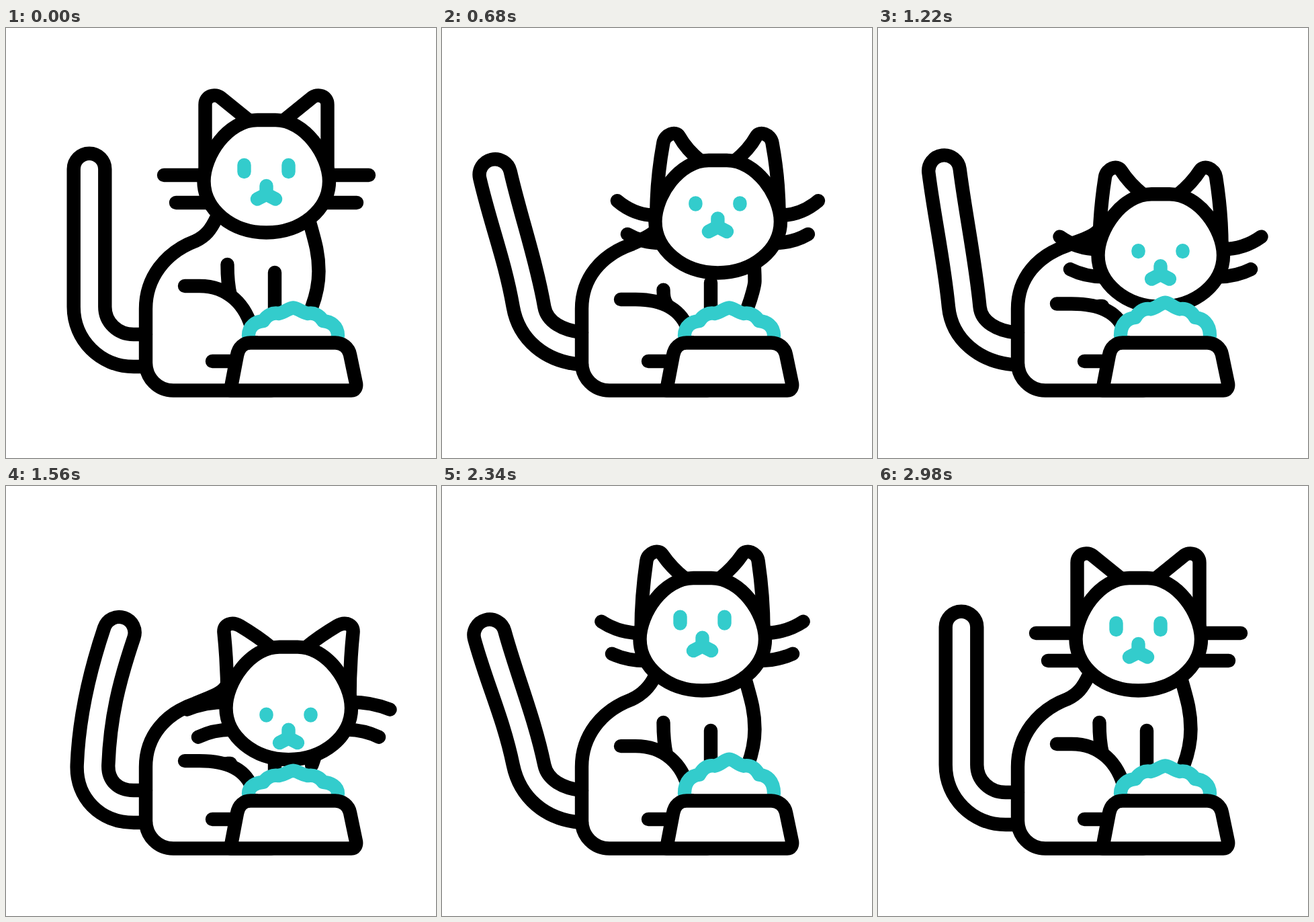
Animation, 640 px wide and 640 px high, one loop 3.3 s. Source, as an HTML page:

```html
<!DOCTYPE html>
<html lang="en">
<head>
<meta charset="utf-8">
<title>Cat at its bowl</title>
<style>
  html, body { margin: 0; width: 100%; height: 100%; overflow: hidden; background: #fff; }
  svg { display: block; width: 100vw; height: 100vh; }
  path { fill: none; stroke: #000; stroke-width: 20.4; stroke-linecap: round; stroke-linejoin: round; }
  .solid { fill: #fff; }
  .teal { stroke: #33cccc; }
</style>
</head>
<body>
<svg viewBox="0 0 640 640">
  <path id="tail"/>
  <path id="body"/>
  <path id="legs"/>
  <g id="head">
    <path id="whiskers"/>
    <path id="ears"/>
    <path class="solid" d="M374 137H401C445 137 481 190 481 228C481 270 440 304.500 387.500 304.500C336 304.500 294.500 270 294.500 228C294.500 190 330 137 374 137Z"/>
    <path id="face" class="teal"/>
  </g>
  <path id="food" class="solid teal"/>
  <path class="solid" d="M334 539.500L344 487C346 475 354 468.500 364 468.500H490C501 468.500 510 476 512 486L521 529C522 535 519 539.500 514 539.500Z"/>
</svg>
<script>
const LOOP = 3300, START = 200, END = 2980, MID = 387.5;
const $ = id => document.getElementById(id);
const draw = (id, d) => $(id).setAttribute('d', d);
const ease = u => (1 - Math.cos(Math.PI * u)) / 2;

// Eases from rest through a few [time, value] poses and back to rest.
function poses(...keys) {
  keys = [[START, 0], ...keys, [END, 0]];
  return t => {
    const i = keys.findIndex(k => k[0] > t);
    if (i < 1) return 0;
    const [t0, v0] = keys[i - 1], [t1, v1] = keys[i];
    return v0 + (v1 - v0) * ease((t - t0) / (t1 - t0));
  };
}

// Rise a little, take two bites with a short lift between, chew, rise again.
const headY = poses([380, -38], [880, 111], [1060, 82], [1250, 112], [1500, 112], [1670, 79], [1890, 112], [2170, -36], [2300, 0]);
const headX = poses([380, 0], [860, 33], [1900, 33], [2170, 0]);
const gazeDown = poses([660, 0], [900, 19], [1960, 19], [2200, 0]);
const sway = poses([580, -70], [930, 60], [1270, -30], [1830, 110], [2210, -70], [2660, 16]);
const puff = poses([700, 0], [940, 9], [1240, -8], [1750, 14], [2300, -10]);
const settle = poses([2320, 0], [2400, 0.9]);

// Loose parts trail behind the head: 1 while it drops, -1 while it rises.
const drag = t => Math.tanh((headY(t) - headY(t - 100)) / 17 + settle(t));

function drawTail(s) {
  const half = 23.3, rad = Math.PI / 180;
  const k = Math.min(1, Math.abs(s) / 30), left = s < 0 ? k : 0;
  const tipAngle = s * (s > 0 ? 0.42 : 0.29) * rad;
  const baseAngle = s * (s > 0 ? 0.05 : 0.22) * rad;
  const tipY = 210 + Math.min(12, 0.0042 * s * s);
  const along = ([x, y], angle, n) => [x + n * Math.sin(angle), y - n * Math.cos(angle)];
  const side = sign => {
    const base = [124 + 5 * k + sign * half, 415];
    const tip = [124 + s + sign * half * Math.cos(tipAngle), tipY + sign * half * Math.sin(tipAngle)];
    return { base, tip, up: along(base, baseAngle, 70), down: along(tip, tipAngle, -70) };
  };
  const l = side(-1), r = side(1), joint = 190 + 18 * left;
  const low = 504 - 3 * k, high = 456 - 3 * k;
  draw('tail', `M208 ${low}H${joint}C${140 + 13 * left} ${low - 4 * left} ${along(l.base, baseAngle, -49)} ${l.base}
    C${l.up} ${l.down} ${l.tip}A${half} ${half} 0 0 1 ${r.tip}C${r.down} ${r.up} ${r.base}
    C${along(r.base, baseAngle, -23)} ${166 + 14 * left} ${high - 3 * left} ${joint} ${high}H208`);
}

function drawBody(x, y, lag) {
  const sag = 0.7 * x + 4 * Math.abs(lag);
  const slump = y * (y < 0 ? 1 : 0.15);
  const neckX = 313 + 0.36 * x + 5 * Math.abs(lag);
  const shoulder = 317 + 0.25 * sag;
  draw('body', `M${neckX} ${283 + slump}C${neckX - 8} ${300 + slump * 0.7} 297 ${shoulder - 7} 282 ${shoulder}
    C237 ${334 + 0.2 * sag} 208 372 208 418V498C208 521 226 539.500 249 539.500H395M307 496H340
    M266 ${384 + sag}H288C330 ${384 + sag} 358 ${412 + 0.4 * sag} 367 452`);
  const knee = 398 + 0.6 * sag;
  draw('legs', `M329.500 ${Math.min(352 + 0.63 * y, knee)}Q329.500 ${Math.min(380 + 0.4 * y, knee)} 334 ${knee}
    M400 ${364 + 0.25 * y}V424
    M${451 + 0.6 * x} ${286 + y}C${460 + 0.2 * x} ${318 + 0.7 * y} 465.500 ${335 + 0.4 * y} 465.500 ${362 + 0.25 * y}
    C465.500 382 461 400 455 416`);
}

const bothSides = make => make(d => MID - d) + make(d => MID + d);

function drawHead(x, y, lag, gaze) {
  $('head').setAttribute('transform', `translate(${x} ${y})`);
  const flop = -22 * lag, lowFlop = flop * (flop > 0 ? 1 : 0.6);
  draw('whiskers', bothSides(p => `M${p(92)} 219Q${p(124)} 219 ${p(152.5 - 3 * Math.abs(lag))} ${219 + flop}
    M${p(85)} 260Q${p(112)} 260 ${p(134.5)} ${260 + lowFlop}`));

  const lean = 10 * lag, top = 104 - 0.3 * lean, edge = 91 - lean, tip = 67.5 - lean;
  draw('ears', bothSides(p => `M${p(91)} 215Q${p(91)} 165 ${p(edge)} ${top + 10}
    C${p(edge - 0.25 * lean)} ${top - 3} ${p(tip + 0.43 * (46.5 - tip) * -1)} ${top - 0.43 * (121 - top)} ${p(tip)} ${top}
    Q${p(46.5)} 121 ${p(25.5)} 138`));

  const squint = 8 * Math.min(1, x / 20);
  draw('face', bothSides(p => `M${p(33)} ${204 + gaze + squint}V${214 + gaze}
    M${MID} ${235 + gaze}V${247.5 + gaze}L${p(13.5)} ${254.5 + gaze}`));
}

function drawFood(offset) {
  const stretch = 1 - offset / 56;
  const left = [[361, 443], [372, 437], [383, 436], [388, 428], [396, 423], [406, 425], [416, 423], [420, 417]];
  const right = left.map(([x, y]) => [855 - x, y]).reverse();
  const curve = [...left, [427.5, 416.5], ...right].map(([x, y]) => [x, 472 + (y - 472) * stretch]);
  draw('food', `M361 458C${curve.join(' ')} 494 458`);
}

function render(t) {
  const x = headX(t), y = headY(t), lag = drag(t);
  drawTail(sway(t));
  drawBody(x, y, lag);
  drawHead(x, y, lag, gazeDown(t) - 12 * lag);
  drawFood(puff(t));
}

const begin = performance.now();
function tick(now) {
  render(Math.max(0, now - begin) % LOOP);
  requestAnimationFrame(tick);
}
render(0);
requestAnimationFrame(tick);
</script>
</body>
</html>
```
